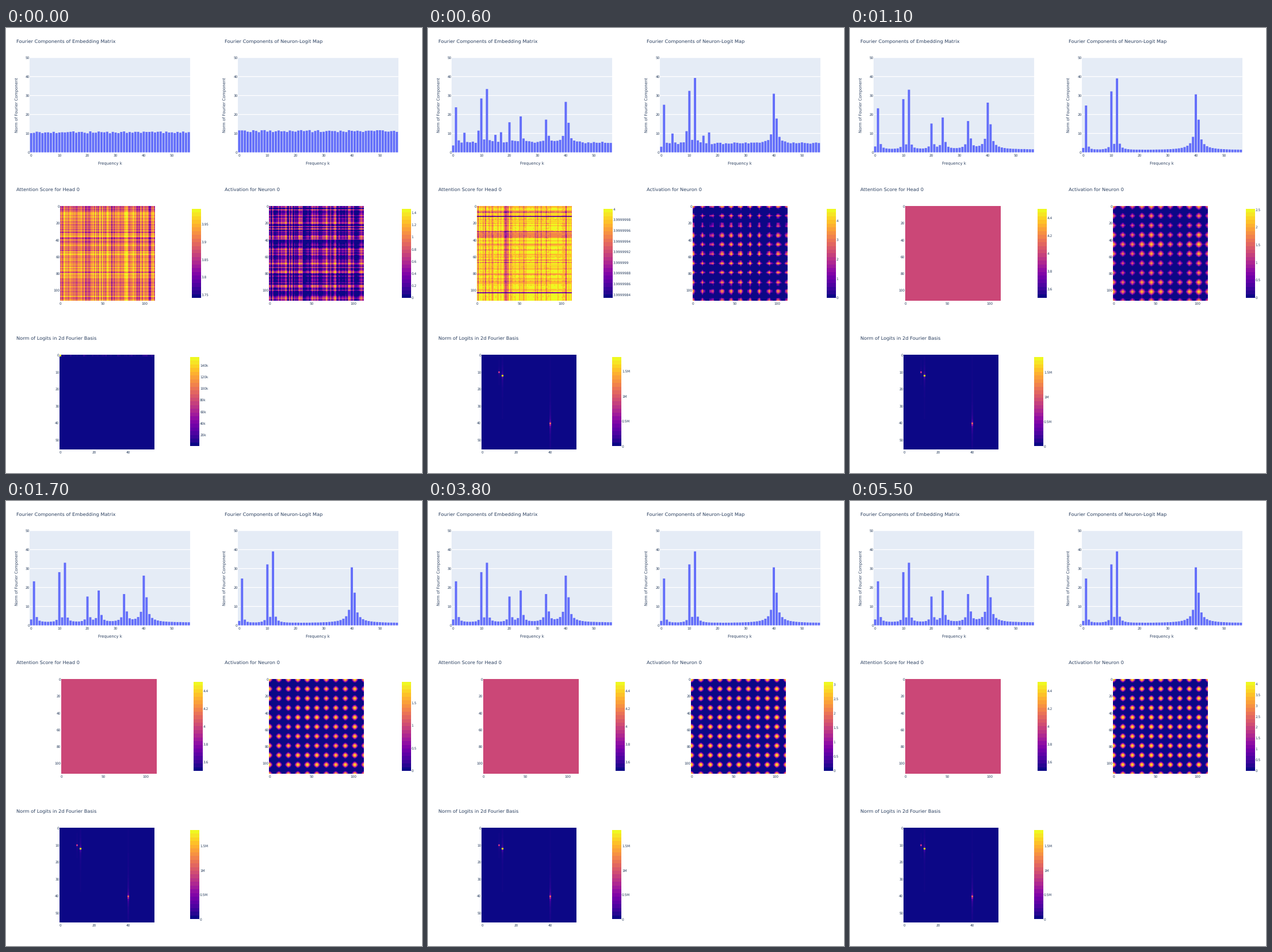
Write a matplotlib script that moves like this. It is 723 px wide and 775 px high and loops after 5.6 s.

```python
import math

import matplotlib as mpl
import matplotlib.pyplot as plt
import numpy as np
from matplotlib.animation import FuncAnimation
from matplotlib.patches import Rectangle

W, H, DPI = 723, 775, 64
FRAMES, STEP_MS = 56, 100
INK, PANEL, BAR = "#2a3f5f", "#e5ecf6", "#636efa"
N, SIDE = 113, 165            # tokens per axis, heatmap side in pixels
BAR_W, BAR_H = 15.4, 154.4    # colour scale size
TICK, AXIS, HEAD = 5.75, 6.86, 8.22

mpl.rcParams["text.hinting"] = "none"
mpl.rcParams["font.family"] = "DejaVu Sans"

fig = plt.figure(figsize=(W / DPI, H / DPI), dpi=DPI, facecolor="white")
ax = fig.add_axes([0, 0, 1, 1])
ax.axis("off")


def px(size):
    return size * 72 / DPI


def label(x, y, s, size=TICK, ha="left"):
    """Text whose capitals are centred on y."""
    return ax.text(x, y + 0.365 * size, s, fontsize=px(size), ha=ha,
                   va="baseline", color=INK)


# ---------------------------------------------------------------- bar charts
K = np.arange(57)
KW, UNIT = 4.892, 3.3


def leak(centre, size):
    """Share of a wave of fractional frequency that lands on each bin."""
    gap = np.abs(np.arange(size) - centre)
    return gap.min() / gap


# (frequency, final height, share reached after 300 ms)
EMBED = [(1.15, 23.2, 0.85), (10.08, 28, 0.92), (12.1, 33, 0.83),
         (20.2, 15.1, 0), (24.22, 18.3, 0.45), (33.3, 16.4, 0),
         (40.36, 26.2, 0.76)]
NEURON = [(1.1, 24.7, 0.77), (10.07, 32.1, 0.84), (12.1, 39, 0.71),
          (40.36, 30.6, 0.65)]
PASSING = {4: 12.5, 9: 14, 15: 10.5, 17: 13.5}


class BarChart:
    def __init__(self, dx, name, peaks, floor, seed):
        self.peaks, self.floor = peaks, floor
        rng = np.random.default_rng(seed)
        self.start, self.later = rng.uniform(-1, 1, (2, 57))
        left, top, base = 41.3 + dx, 51.5, 216.6
        label(18 + dx, 22.5, name, HEAD)
        ax.add_patch(Rectangle((left, top), 57 * KW, base - top, fc=PANEL,
                               lw=0, zorder=1))
        for v in range(0, 51, 10):
            y = base - UNIT * v
            ax.plot([left, left + 57 * KW], [y, y], color="white",
                    lw=px(1.3), zorder=2, solid_capstyle="butt", snap=False)
            label(left - 0.3, y, str(v), ha="right")
            label(left + (v + 0.5) * KW, 221.6, str(v), ha="center")
        label(left + 28.5 * KW, 235.5, "Frequency k", AXIS, "center")
        ax.text(18.4 + dx, 134, "Norm of Fourier Component", rotation=90,
                fontsize=px(AXIS), ha="center", va="center", color=INK)
        self.bars = [
            ax.add_patch(Rectangle((left + (k + 0.1) * KW, base), 0.8 * KW, 0,
                                   fc=BAR, lw=0, zorder=3, snap=False))
            for k in K]

    def heights(self, n):
        """Noise floor and peaks, added in quadrature."""
        t = [0, 3, 6, 11]
        rough = (np.interp(n, [0, 3], [0.05, 0]) * self.start
                 + np.interp(n, t, [0, 0.08, 0.1, 0.03]) * self.later)
        floor = np.interp(n, t, self.floor) * (1 + rough)
        floor[0] *= np.interp(n, [0, 3], [1, 0.4])
        power = floor ** 2
        for centre, height, share in self.peaks:
            grown = np.interp(n, [0, 3, 6], [0, share, 1])
            power += (height * grown * leak(centre, 57)) ** 2
        for k, height in PASSING.items():
            power[k] += (height * np.interp(n, t, [0, 1, 0.7, 0])) ** 2
        return np.sqrt(power)

    def show(self, n):
        for bar, h in zip(self.bars, self.heights(n)):
            bar.set_height(-UNIT * h)


# ------------------------------------------------------------------ heatmaps
def nice_step(span):
    rough = span / 8.5
    base = 10.0 ** math.floor(math.log10(rough))
    return next(m * base for m in (1, 2, 5, 10) if rough <= m * base * 1.0001)


def plain(v, step):
    digits = max(0, -math.floor(math.log10(step) + 1e-6))
    s = f"{v:.{digits}f}"
    return s.rstrip("0").rstrip(".") if "." in s else s


def si(v, step):
    if v < step / 2:
        return "0"
    if step >= 1.5e5:
        return f"{v / 1e6:.1f}".replace(".0", "") + "M"
    return f"{v / 1e3:.0f}k"


class HeatMap:
    """Heatmap with a colour scale; wide scale labels push both to the left."""

    def __init__(self, x, y, name, cells, tick_step, right, scale_x, fmt):
        self.x, self.y, self.right, self.scale_x = x, y, right, scale_x
        self.cell, self.fmt = SIDE / cells, fmt
        label(18 if x < 300 else 379.5, y - 29.1, name, HEAD)
        style = dict(cmap="plasma", vmin=0, vmax=1, aspect="auto")
        smooth = "hanning" if cells == N else "nearest"
        self.img = ax.imshow(np.zeros((cells, cells)), interpolation=smooth,
                             **style)
        self.scale = ax.imshow(np.linspace(1, 0, 24)[:, None],
                               interpolation="nearest", **style)
        across, down = tick_step
        self.xt = [(t, label(0, y + SIDE + 4.8, str(t), ha="center"))
                   for t in range(0, cells, across)]
        self.yt = [label(0, y + (t + 0.5) * self.cell, str(t), ha="right")
                   for t in range(0, cells, down)]
        self.marks = [label(0, 0, "") for _ in range(12)]

    def show(self, data, lo, hi):
        step = nice_step(hi - lo)
        first = math.ceil(lo / step - 1e-4)
        last = math.floor(hi / step + 1e-4)
        vals = [i * step for i in range(first, last + 1)]
        names = [self.fmt(v, step) for v in vals]
        sx = self.scale_x
        if self.right:
            wide = max(3.55 * len(s.replace(".", "")) + 1.65 * s.count(".")
                       for s in names)
            sx = self.right - 1.5 - BAR_W - wide
        x = self.x + (sx - self.scale_x) / 2
        top = self.y + 5.4
        self.img.set_data(data)
        self.img.set_extent((x, x + SIDE, self.y + SIDE, self.y))
        self.scale.set_extent((sx, sx + BAR_W, top + BAR_H, top))
        for t, txt in self.xt:
            txt.set_x(x + (t + 0.5) * self.cell)
        for txt in self.yt:
            txt.set_x(x - 0.6)
        for txt in self.marks:
            txt.set_text("")
        for txt, v, s in zip(self.marks, vals, names):
            y = top + BAR_H * (hi - v) / (hi - lo)
            txt.set_position((sx + BAR_W + 1.5, y + 0.365 * TICK))
            txt.set_text(s)


rng = np.random.default_rng(8)


# Attention: stripes that saturate at 4 and then go flat
def saturated(shape, scale, grain, levels, band):
    r, c = rng.gamma(shape, scale, (2, N))
    r[band] += 0.25
    c[band] += 0.3
    v = 1 - r[:, None] - c - grain * np.abs(rng.normal(size=(N, N)))
    return np.round(np.clip(v, 0, 1) * levels) / levels


early = 0.68 + 0.11 * rng.normal(size=(N, 1)) + 0.14 * rng.normal(size=N)
middle = saturated(0.5, 0.16, 0.06, 10, slice(83, 86))
late = saturated(0.28, 0.22, 0.02, 7, slice(32, 38))
flat = np.full((N, N), 0.5)


def attention(n):
    if n >= 9:
        return flat, 3.5, 4.5
    if n < 3:
        data = early + (middle - early) * n / 3
    else:
        data = middle + (late - middle) * min(1, (n - 3) / 3)
    logs = np.log([0.2514, 2.37e-6, 1.66e-6])
    span = math.exp(np.interp(n, [0, 3, 6], logs))
    hi = 4 - span * np.interp(n, [0, 3], [0.027, 0])
    return data, hi - span, hi


# Neuron: noise that gives way to a clean wave of frequency 10
def wave(k, shift=0):
    return np.cos(2 * np.pi * k * (np.arange(N) - shift) / N)


noise = rng.uniform(-1, 1, N)
noise[40:44] = -1
uneven = 0.25 * wave(2, 45) + 0.12 * wave(40)


def activation(n):
    clean = np.interp(n, [0, 3, 6, 11], [0, 0.55, 0.8, 1])
    u = clean * (wave(10) + np.interp(n, [11, 18], [1, 0.1]) * uneven)
    u += 1.5 * (1 - clean) * noise
    cut = np.interp(n, [0, 3, 11, 17], [-1.1, 0.55, 0.35, 0.4])
    v = np.maximum(u[:, None] + u - cut, 0)
    if n <= 17:
        logs = np.log([1.461, 11.37, 4.6, 2.516, 1.957])
        hi = math.exp(np.interp(n, [0, 3, 6, 11, 17], logs))
    else:
        hi = np.interp(n, [17, 38, 55], [1.957, 3.08, 4.08])
    return v / v.max(), 0, hi


# Logits: bright spots on the diagonal, each leaking along its column
SPOTS = [(10.07, 0.7, 0.42), (12.1, 1, 1), (40.36, 0.27, 0.57)]
edge = rng.uniform(0, 1, 56) ** 3


def logits(n):
    v = np.zeros((56, 56))
    for centre, soon, final in SPOTS:
        height = np.interp(n, [0, 3, 6], [0, soon, final])
        v[:, round(centre)] = height * leak(centre, 56)
    v[0] = np.interp(n, [0, 3, 6], [0.08, 0.25, 0]) * edge
    v[:, 0] = np.interp(n, [0, 3, 6], [0, 0.12, 0]) * edge[::-1]
    v[0, 0] = np.interp(n, [0, 3, 6], [1, 0.25, 0])
    lo = np.interp(n, [0, 3, 6], [660, 6700, 0])
    hi = np.interp(n, [0, 3, 6, 17], [153500, 744000, 1.778e6, 1.819e6])
    return v, lo, hi


charts = [BarChart(0, "Fourier Components of Embedding Matrix", EMBED,
                   [10.6, 12.1, 5.1, 1.5], 3),
          BarChart(361.6, "Fourier Components of Neuron-Logit Map", NEURON,
                   [11.2, 11.4, 4.7, 1.2], 13)]
maps = [
    (HeatMap(94, 310.2, "Attention Score for Head 0", N, (50, 20),
             351.7, 322.4, plain), attention),
    (HeatMap(457.3, 310.2, "Activation for Neuron 0", N, (50, 20),
             713.2, 687.5, plain), activation),
    (HeatMap(93, 568.6, "Norm of Logits in 2d Fourier Basis", 56, (20, 10),
             None, 320.2, si), logits),
]
ax.set_autoscale_on(False)
ax.set_xlim(0, W)
ax.set_ylim(H, 0)


def update(n):
    for chart in charts:
        chart.show(n)
    for panel, state in maps:
        panel.show(*state(n))
    return []


anim = FuncAnimation(fig, update, frames=FRAMES, interval=STEP_MS,
                     init_func=lambda: update(0), repeat=True, repeat_delay=0,
                     blit=False)
plt.show()
```
